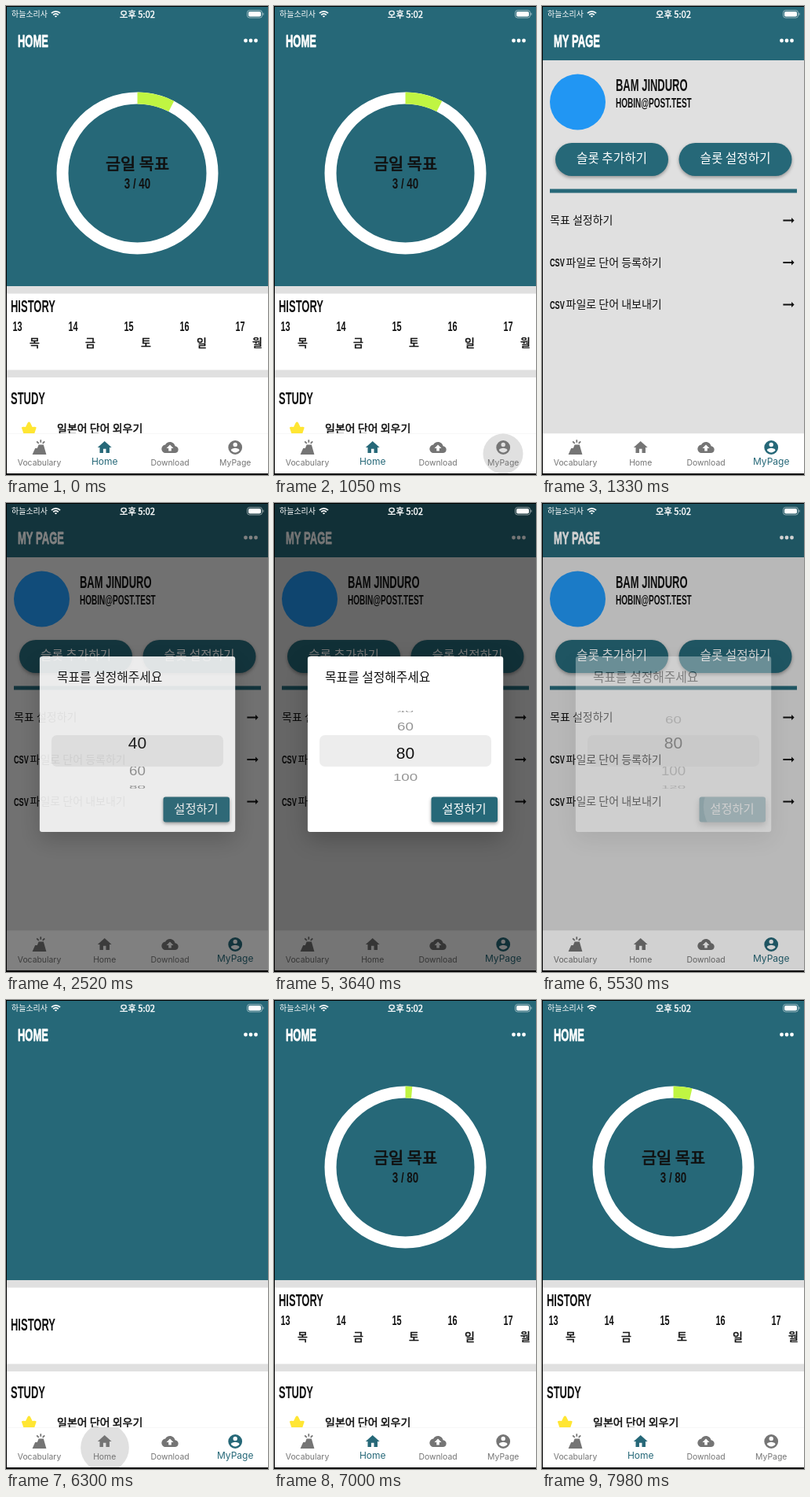
These frames come from a looping animation (334 by 596 pixels, 8 s). An HTML page with a canvas:

```html
<!DOCTYPE html>
<html lang="ko">
<head>
<meta charset="utf-8">
<title>Study goal</title>
<style>
html, body { margin: 0; width: 100%; height: 100%; overflow: hidden; background: #000; }
canvas { display: block; width: 334px; height: 596px; }
</style>
</head>
<body>
<canvas id="stage"></canvas>
<script>
const W = 334, H = 596, LOOP = 8000, STEP = 70;
const TEAL = '#266878', PALE = '#e0e0e0', INK = '#111';
const HANGUL = '"Noto Sans CJK KR", "Noto Sans CJK", sans-serif';
const ARIAL = '"Liberation Sans", Arial, sans-serif';
const INTER = 'Inter, sans-serif';
// Narrow display style: one factor for capitals, one for numerals.
const CAPS = 0.59, DIGITS = 0.74;
// Outline in em that turns a regular cut into a medium one.
const MEDIUM = 0.035;

const dpr = window.devicePixelRatio || 1;
const stage = document.getElementById('stage');
const layer = document.createElement('canvas');
for (const canvas of [stage, layer]) {
  canvas.width = W * dpr;
  canvas.height = H * dpr;
  canvas.getContext('2d').scale(dpr, dpr);
}
const screenCtx = stage.getContext('2d');
const layerCtx = layer.getContext('2d');
let c = screenCtx;

const ramp = (t, a, b) => Math.min(1, Math.max(0, (t - a) / (b - a)));
const easeOut = p => 1 - (1 - p) ** 3;
const mix = (a, b, p) => a + (b - a) * p;

function rect(x, y, w, h, fill) {
  c.fillStyle = fill;
  c.fillRect(x, y, w, h);
}

function round(x, y, w, h, r, fill) {
  c.fillStyle = fill;
  c.beginPath();
  c.roundRect(x, y, w, h, r);
  c.fill();
}

function disc(x, y, r, fill) {
  c.fillStyle = fill;
  c.beginPath();
  c.arc(x, y, r, 0, Math.PI * 2);
  c.fill();
}

function withShadow(blur, dy, alpha, draw) {
  c.save();
  c.shadowColor = `rgba(0,0,0,${alpha})`;
  c.shadowBlur = blur * dpr;
  c.shadowOffsetY = dy * dpr;
  draw();
  c.restore();
}

// Text is placed by the vertical middle of its capitals.
function text(str, x, y, size, options = {}) {
  const { fill = INK, align = 'left', weight = 400, family = HANGUL, squeeze = 1, heft = 0 } = options;
  c.save();
  c.translate(x, y + size * 0.36);
  c.scale(squeeze, 1);
  c.font = `${weight} ${size}px ${family}`;
  c.textAlign = align;
  c.fillStyle = c.strokeStyle = fill;
  c.fillText(str, 0, 0);
  if (heft) {
    c.lineWidth = size * heft;
    c.lineJoin = 'round';
    c.strokeText(str, 0, 0);
  }
  c.restore();
}

const narrow = (str, x, y, size, options) =>
  text(str, x, y, size, { weight: 700, family: ARIAL, squeeze: CAPS, ...options });

const icons = {
  volcano: 'M18 8h-7l-2 5H6l-4 9h20zM13 1h2v4h-2zM16 5.5l2.9-2.9 1.4 1.4-2.8 2.9zM7.6 4l1.4-1.4 2.9 2.9-1.4 1.4z',
  home: 'M10 20v-6h4v6h5v-8h3L12 3 2 12h3v8z',
  cloud: 'M19.4 10C18.7 6.6 15.6 4 12 4 9.1 4 6.6 5.6 5.4 8 2.3 8.4 0 10.9 0 14c0 3.3 2.7 6 6 6h13c2.8 0 5-2.2 5-5 0-2.6-2-4.8-4.6-5zM14 13v4h-4v-4H7l5-5 5 5z',
  person: 'M2 12a10 10 0 1 0 20 0a10 10 0 1 0-20 0zM9 8a3 3 0 1 1 6 0a3 3 0 1 1-6 0zM12 19.2c-2.5 0-4.7-1.3-6-3.2 0-2 4-3.1 6-3.1s6 1.1 6 3.1c-1.3 1.9-3.5 3.2-6 3.2z',
  arrow: 'M16 11H4v2h12v3l4-4-4-4z',
  crown: 'M1 10Q2 8 7 9L10 3Q12 0 14 3L17 9Q22 8 23 10L19 22H5z'
};
for (const name in icons) icons[name] = new Path2D(icons[name]);

function icon(name, x, y, fill, scale = 0.89) {
  c.save();
  c.translate(x, y);
  c.scale(scale, scale);
  c.translate(-12, -12);
  c.fillStyle = fill;
  c.fill(icons[name], 'evenodd');
  c.restore();
}

function statusBar() {
  text('하늘소리사', 7, 10.5, 10, { fill: '#fff' });
  text('오후 5:02', 167.5, 10.5, 11.2, { fill: '#fff', align: 'center', heft: MEDIUM });
  c.strokeStyle = '#fff';
  c.lineWidth = 1.8;
  for (const r of [1.4, 4.6, 7.8]) {
    c.beginPath();
    c.arc(63.5, 14.6, r, -Math.PI * 0.75, -Math.PI * 0.25);
    c.stroke();
  }
  c.strokeStyle = 'rgba(255,255,255,.5)';
  c.lineWidth = 1;
  c.beginPath();
  c.roundRect(307.5, 5.5, 19, 9.5, 3);
  c.stroke();
  round(309, 7, 16, 6.5, 1.8, '#fff');
  rect(327.4, 8.7, 1.2, 3, 'rgba(255,255,255,.5)');
}

function header(title, height) {
  rect(1, 1, W, height, TEAL);
  narrow(title, 15, 44, 22, { fill: '#fff', heft: MEDIUM });
  for (const x of [305.5, 312, 318.5]) disc(x, 44, 2.4, '#fff');
}

function goalRing(done, goal, grown) {
  const x = 167.5, y = 212.5, top = -Math.PI / 2;
  const arc = (share, color) => {
    c.strokeStyle = color;
    c.lineWidth = 15;
    c.beginPath();
    c.arc(x, y, 95.5, top, top + Math.PI * 2 * share);
    c.stroke();
  };
  arc(1, '#fff');
  if (grown > 0) arc(done / goal * grown, '#c0f542');
  text('금일 목표', x, 201, 20.8, { align: 'center', heft: MEDIUM });
  narrow(`${done} / ${goal}`, x, 226, 18, { align: 'center', squeeze: DIGITS });
}

function homePage(t) {
  const first = t < 1120, loaded = first || t >= 6440;
  rect(1, 1, W, 593, '#fff');
  header('HOME', 355);
  if (loaded) goalRing(3, first ? 40 : 80, first ? 1 : ramp(t, 6440, 7980));
  rect(1, 356, W, 9.5, PALE);
  narrow('HISTORY', 6, loaded ? 381 : 412, 22);
  if (loaded) {
    [...'목금토일월'].forEach((day, i) => {
      narrow(String(13 + i), 8.5 + i * 71, 407.5, 16, { squeeze: 0.68 });
      text(day, 30 + i * 71, 428, 14, { heft: MEDIUM });
    });
  }
  rect(1, 462.5, W, 9.5, PALE);
  narrow('STUDY', 6, 498, 22);
  icon('crown', 29.3, 537.5, '#ffe633', 0.86);
  text('일본어 단어 외우기', 65, 536.5, 14, { heft: MEDIUM });
}

function pillButton(label, x) {
  withShadow(4, 2, 0.35, () => round(x, 174, 144, 42, 21, TEAL));
  text(label, x + 72, 193.5, 15.7, { fill: '#fff', align: 'center' });
}

function myPage() {
  rect(1, 1, W, 593, PALE);
  header('MY PAGE', 68);
  disc(45.5, 122, 35.5, '#2196f3');
  narrow('BAM JINDURO', 94, 100, 22);
  narrow('HOBIN@POST.TEST', 94, 123, 17);
  pillButton('슬롯 추가하기', 17);
  pillButton('슬롯 설정하기', 174.5);
  rect(10, 232.5, 315, 5, TEAL);
  text('목표 설정하기', 10, 272, 14);
  ['등록하기', '내보내기'].forEach((action, i) => {
    const y = 325.5 + i * 53.5;
    narrow('CSV', 10, y, 15.5);
    text(`파일로 단어 ${action}`, 30.5, y, 14);
  });
  for (let i = 0; i < 3; i++) icon('arrow', 314.5, 272.5 + i * 53.5, INK);
}

function ripple(x, age, life) {
  if (age < 0 || age >= life) return;
  const alpha = 0.12 * (1 - ramp(age, 70, life));
  disc(x, 569, mix(22, 37, ramp(age, -46, 150)), `rgba(0,0,0,${alpha})`);
}

function navBar(t) {
  const toMine = ramp(t, 1120, 1330) - ramp(t, 6300, 6510);
  c.save();
  c.beginPath();
  c.rect(1, 543, W, 51);
  c.clip();
  rect(1, 543, W, 51, '#fff');
  rect(1, 543, W, 1, 'rgba(0,0,0,.03)');
  ripple(292, t - 1050, 280);
  ripple(126, t - 6230, 490);
  const tabs = [
    ['Vocabulary', 'volcano', 42.5, 0],
    ['Home', 'home', 125.7, 1 - toMine],
    ['Download', 'cloud', 209, 0],
    ['MyPage', 'person', 292.2, toMine]
  ];
  for (const [label, glyph, x, on] of tabs) {
    const tone = [[117, 38], [117, 104], [117, 120]].map(([a, b]) => Math.round(mix(a, b, on)));
    const fill = `rgb(${tone})`;
    icon(glyph, x, 561, fill);
    text(label, x, mix(580, 579, on), mix(10.4, 12, on), { fill, align: 'center', family: INTER });
  }
  c.restore();
}

// Number drum seen from the front; the middle band is slightly magnified.
function drum(scroll) {
  const mid = 313.5, radius = 50, turn = 40.5 * Math.PI / 180, tilt = 8.8 * Math.PI / 180;
  const band = (top, bottom, zoom, alpha) => {
    c.save();
    c.beginPath();
    c.rect(58, top, 219, bottom - top);
    c.clip();
    c.globalAlpha = alpha;
    for (let i = 0; i < 6; i++) {
      const angle = (i - scroll) * turn - tilt;
      if (Math.abs(angle) > 1.55) continue;
      c.save();
      c.translate(167.5, mid + zoom * radius * Math.sin(angle));
      c.scale(zoom, zoom * Math.cos(angle));
      text(String(40 + i * 20), 0, 0, 18.7, { align: 'center', family: ARIAL });
      c.restore();
    }
    c.restore();
  };
  round(58, 295, 219, 40, 7, '#ededed');
  band(264, 295, 1, 0.447);
  band(295, 335, 1.12, 1);
  band(335, 363, 1, 0.447);
}

function dialog(t) {
  const scroll = 1.78 * easeOut(ramp(t, 3290, 3850)) + 0.22 * easeOut(ramp(t, 4270, 4690));
  const press = ramp(t, 5250, 5390);
  withShadow(28, 10, 0.22, () => round(42.9, 195, 249.3, 223, 3, '#fff'));
  text('목표를 설정해주세요', 65, 221, 15.8);
  drum(scroll);
  withShadow(mix(4, 9, press), mix(2, 4, press), 0.4, () => round(200.5, 373.5, 84.5, 32, 3, TEAL));
  if (press > 0) {
    c.save();
    c.beginPath();
    c.roundRect(200.5, 373.5, 84.5, 32, 3);
    c.clip();
    rect(200, 373, 86, 33, `rgba(255,255,255,${0.07 * press})`);
    disc(247.5, 386, 15 * press + 40 * ramp(t, 5390, 5600), 'rgba(255,255,255,.22)');
    c.restore();
  }
  text('설정하기', 242.5, 388, 15.3, { fill: '#fff', align: 'center' });
}

function drawDialog(t) {
  if (t < 2520 || t >= 5600) return;
  const opening = ramp(t, 2520, 2660), staying = 1 - ramp(t, 5390, 5600);
  c = layerCtx;
  c.clearRect(0, 0, W, H);
  dialog(t);
  c = screenCtx;
  rect(1, 1, W, 593, `rgba(0,0,0,${0.54 * mix(0.92, 1, opening) * staying})`);
  c.globalAlpha = mix(0.87, 1, opening) * staying;
  c.drawImage(layer, 0, 0, W, H);
  c.globalAlpha = 1;
}

function draw(now) {
  const t = Math.floor(now % LOOP / STEP) * STEP;
  if (t < 1120 || t >= 6300) homePage(t);
  else myPage();
  navBar(t);
  drawDialog(t);
  statusBar();
  rect(0, 0, 1, H, '#000');
  rect(0, 0, W, 1, '#000');
  rect(0, 594, W, 2, '#000');
}

const start = performance.now();
function tick() {
  draw(performance.now() - start);
  requestAnimationFrame(tick);
}
tick();
</script>
</body>
</html>
```
